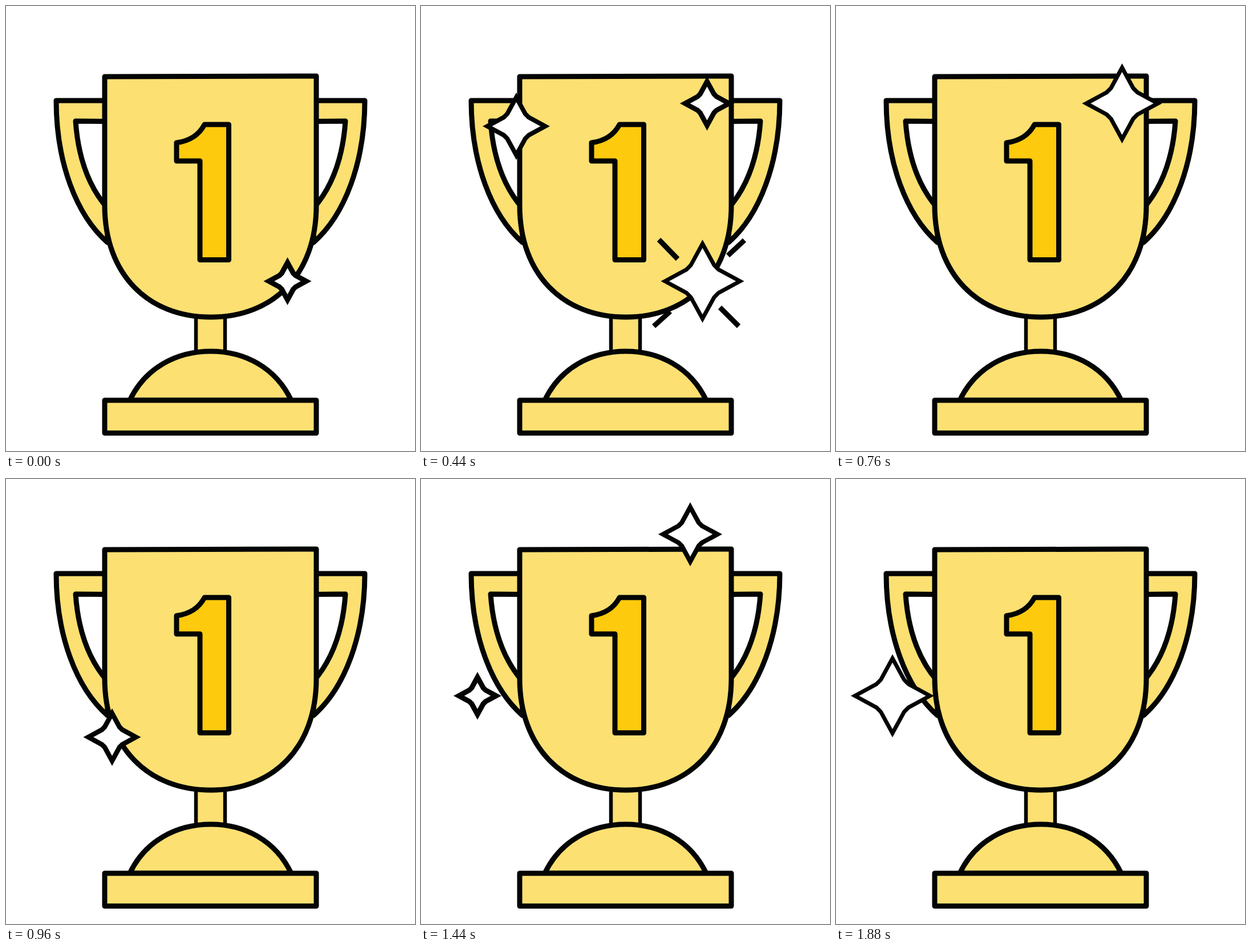
Animation of 717 by 781 pixels, one loop 1920 ms. Source, as an HTML page:

```html
<!DOCTYPE html>
<html lang="en">
<head>
<meta charset="utf-8">
<title>Trophy</title>
<style>
  html, body { margin: 0; width: 100%; height: 100%; overflow: hidden; background: #fff; }
  svg { display: block; width: 100%; height: 100%; }
  .line { stroke: #030504; stroke-width: 9; stroke-linejoin: round; }
  .gold { fill: #fce072; }
  .white { fill: #fff; }
  .star { fill: #fff; stroke: #030504; stroke-miterlimit: 6; }
  .rays { fill: none; stroke: #030504; stroke-width: 9; }
</style>
</head>
<body>
<svg viewBox="0 0 717 781">
  <defs>
    <g id="handle" class="line">
      <path class="gold" d="M178 166H88C88 274 123 367 178 415Z"/>
      <path class="white" d="M178 202.500L122 202C126 260 143 315 178 355Z"/>
    </g>
  </defs>
  <use href="#handle"/>
  <use href="#handle" transform="matrix(-1 0 0 1 717 0)"/>
  <path class="line gold" style="stroke-width:6.5" d="M333 540H384V612H333Z"/>
  <path class="line gold" d="M217 692C244 635 299 606 359 606S473 635 500 692Z"/>
  <path class="line gold" d="M173 692H544V749.500H173Z"/>
  <path class="line gold" d="M173 124L544 123V350C544 471 469 546 359 546S173 471 173 350Z"/>
  <path class="line" fill="#fdca0d" d="M348 208H390.500V445.500H340V272H299V240C321 237 338 227 348 208Z"/>
  <g id="sparkles"></g>
</svg>
<script>
  const LOOP = 1920, STEP = 40, LIFE = 480, GROW = 440;
  const layer = document.getElementById("sparkles");

  function addPath(className) {
    const path = document.createElementNS("http://www.w3.org/2000/svg", "path");
    path.setAttribute("class", className);
    layer.append(path);
    return path;
  }

  // The rays belong to the first sparkle.
  const RAY_START = 360, RAY_END = 720;
  const rays = addPath("rays");
  rays.setAttribute("d", "M-76-73L-43-39M74-72L45-45M31 46L64 79M-56 53L-85 79");

  // x, y, start time
  const stars = [
    [493.5, 483, 0],
    [167, 211, 200],
    [501.5, 171, 360],
    [186, 453, 840],
    [472, 97, 1240],
    [99, 380.5, 1440]
  ].map(([x, y, start]) => {
    const path = addPath("star");
    path.setAttribute("transform", `translate(${x} ${y})`);
    return { path, start };
  });

  // Four points joined by rounded waists.
  function starPath(r) {
    const a = 0.31 * r, b = 0.43 * r, c = 0.37 * r;
    return `M0 ${-r}L${a} ${-b}Q${c} ${-c} ${b} ${-a}L${r} 0` +
      `L${b} ${a}Q${c} ${c} ${a} ${b}L0 ${r}` +
      `L${-a} ${b}Q${-c} ${c} ${-b} ${a}L${-r} 0` +
      `L${-b} ${-a}Q${-c} ${-c} ${-a} ${-b}Z`;
  }

  function show(path, visible) {
    path.style.display = visible ? "" : "none";
  }

  function draw(time) {
    const t = Math.floor((time % LOOP) / STEP) * STEP;

    for (const { path, start } of stars) {
      const age = t - start;
      const visible = age >= 0 && age < LIFE;
      show(path, visible);
      if (!visible) continue;
      const p = age / GROW;
      const width = 9 - 2 * p;
      const reach = 42 + 31 * p;
      path.setAttribute("stroke-width", width);
      path.setAttribute("d", starPath(reach - 1.04 * width));
    }

    show(rays, t >= RAY_START && t < RAY_END);
    const scale = 1 + (t - 440) * 0.0004;
    rays.setAttribute("transform", `translate(493 483) scale(${scale})`);
  }

  const begin = performance.now();
  function tick() {
    draw(performance.now() - begin);
    requestAnimationFrame(tick);
  }
  tick();
</script>
</body>
</html>
```
